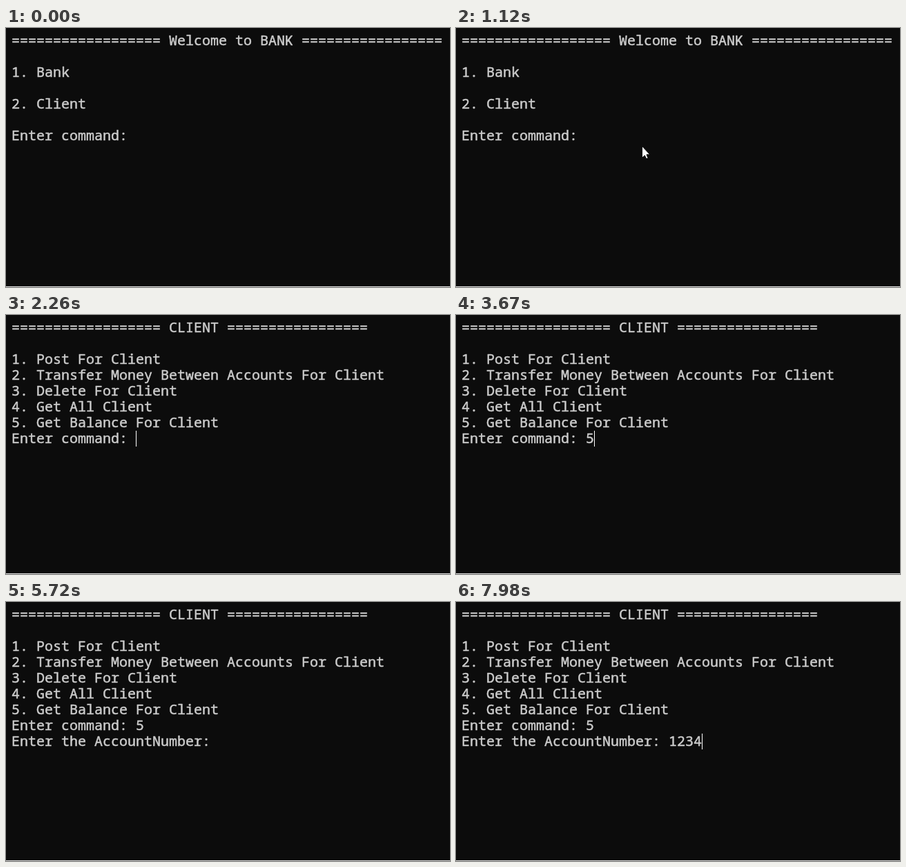
Recreate the animation shown at these times as an HTML page with a canvas. Size 643 px wide and 376 px high, loop 8000 ms.

```html
<!DOCTYPE html>
<html lang="en">
<head>
<meta charset="utf-8">
<title>Bank console</title>
<style>
  html, body { margin: 0; width: 100%; height: 100%; overflow: hidden; background: #0c0c0c; }
  canvas { display: block; }
</style>
</head>
<body>
<canvas id="stage" width="643" height="376"></canvas>
<script>
const ctx = document.getElementById('stage').getContext('2d');
const LOOP = 8000, COL = 12, ROW = 23, LEFT = 8, TOP = 7;

const title = name => `${'='.repeat(18)} ${name} ${'='.repeat(17)}`;
const menu = [title('Welcome to BANK'), '', '1. Bank', '', '2. Client', ''];
const client = [
  title('CLIENT'), '',
  '1. Post For Client',
  '2. Transfer Money Between Accounts For Client',
  '3. Delete For Client',
  '4. Get All Client',
  '5. Get Balance For Client'
];
const command = 'Enter command: ';
const account = 'Enter the AccountNumber: ';

// [start time, typed text, caret visible]
const menuSteps = [[0, '', 0], [1390, '', 1], [1790, '2', 1]];
const clientSteps = [[2260, '', 1], [2850, '', 0], [3460, '', 1], [3670, '5', 1]];
const accountSteps = [
  [4000, '', 1], [4660, '', 0], [5190, '', 1], [5720, '', 0], [6250, '', 1], [6790, '', 0],
  [7180, '1', 1], [7450, '12', 1], [7720, '123', 1], [7980, '1234', 1]
];

function drawConsole(t, lines, prompt, steps) {
  const [, typed, caret] = steps.filter(s => s[0] <= t).pop();
  const all = [...lines, prompt + typed];
  ctx.font = '20px "Noto Sans Mono", "DejaVu Sans Mono", monospace';
  ctx.fillStyle = ctx.strokeStyle = '#ccc';
  ctx.lineWidth = 0.5; // thickens the stems a little
  ctx.lineJoin = 'round';
  all.forEach((line, i) => {
    const y = TOP + i * ROW + 18;
    ctx.fillText(line, LEFT, y);
    ctx.strokeText(line, LEFT, y);
  });
  if (caret) {
    ctx.fillStyle = '#fff';
    ctx.fillRect(LEFT + (prompt + typed).length * COL, TOP + (all.length - 1) * ROW, 1, ROW);
  }
}

const bezier = (a, b, c, u) => (1 - u) ** 2 * a + 2 * u * (1 - u) * b + u * u * c;
const arrow = new Path2D('M.5 .5V17.5L4.3 14L6.5 18.5H9.3L7 12.8H11.8Z');

function drawPointer(t) {
  if (t < 460 || t >= 1790) return;
  const u = Math.min(10, Math.floor((t - 460) / 66)) / 10;
  const x = Math.round(bezier(540, 180, 269, u));
  const y = Math.round(bezier(366, 200, 171, u));
  if (t >= 1390 && t < 1590) {
    ctx.fillStyle = 'rgba(255, 255, 0, 0.47)';
    ctx.beginPath();
    ctx.arc(x, y, 15, 0, 2 * Math.PI);
    ctx.fill();
  }
  ctx.save();
  ctx.translate(x, y);
  ctx.fillStyle = '#fff';
  ctx.strokeStyle = '#0c0c0c';
  ctx.lineWidth = 1;
  ctx.fill(arrow);
  ctx.stroke(arrow);
  ctx.restore();
}

function draw(t) {
  ctx.fillStyle = '#0c0c0c';
  ctx.fillRect(0, 0, 643, 376);
  ctx.fillStyle = '#ddd';
  ctx.fillRect(0, 375, 643, 1);
  if (t < 2260) drawConsole(t, menu, command, menuSteps);
  else if (t < 4000) drawConsole(t, client, command, clientSteps);
  else drawConsole(t, [...client, command + '5'], account, accountSteps);
  drawPointer(t);
}

const start = performance.now();
function tick() {
  draw((performance.now() - start) % LOOP);
  requestAnimationFrame(tick);
}
tick();
</script>
</body>
</html>
```
